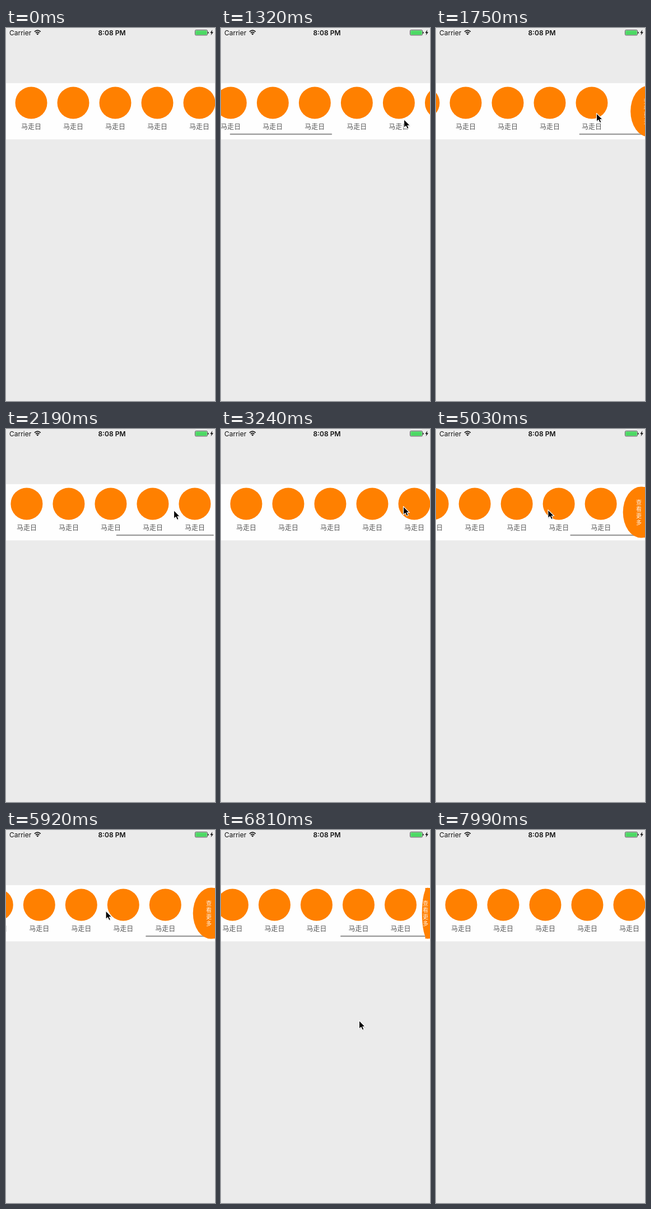
These frames come from a looping animation (373x663 px, 8.43 s). An HTML page:

```html
<!DOCTYPE html>
<html lang="zh">
<head>
<meta charset="utf-8">
<title>Scroll for more</title>
<style>
  html, body { margin: 0; width: 100%; height: 100%; overflow: hidden; background: #ebebeb; }
  svg { display: block; width: 373px; height: 663px; }
  text { text-anchor: middle; }
  .bar { font: 12px Inter, "Open Sans", sans-serif; fill: #111; }
  .label { font: 12px "Noto Sans CJK SC", "Noto Sans CJK", sans-serif; fill: #555; }
  .hint { font: 10px "Noto Sans CJK SC", "Noto Sans CJK", sans-serif; fill: #fff; fill-opacity: .9; }
</style>
</head>
<body>
<svg viewBox="0 0 373 663" xmlns="http://www.w3.org/2000/svg">
  <rect width="373" height="663" fill="#ebebeb"/>

  <g class="bar">
    <text x="6" y="12.5" style="text-anchor:start">Carrier</text>
    <text x="189" y="12.5" style="font-weight:600">8:08 PM</text>
  </g>
  <g fill="none" stroke="#111" stroke-width="1.7">
    <path d="M50.9 6.7Q56.3 1.6 61.7 6.7"/>
    <path d="M53 8.9Q56.3 5.9 59.6 8.9"/>
  </g>
  <path d="M54.2 10.3Q56.3 8.6 58.4 10.3L56.3 12.5Z" fill="#111"/>
  <rect x="337.5" y="3.5" width="22" height="9.4" rx="1.8" fill="none" stroke="#333" stroke-width=".8"/>
  <rect x="338.4" y="4.4" width="20.2" height="7.6" rx="1" fill="#4cd964"/>
  <path d="M360.4 6.4Q362 6.8 362 8.2T360.4 10Z" fill="#222"/>
  <path d="M368.4 3L364.4 8.7H366.8L365.6 13L370 7.2H367.4Z" fill="#111"/>

  <rect y="98" width="373" height="100" fill="#fefefe"/>
  <g id="row"></g>
  <rect id="thumb" y="187.4" height="2.5" rx="1.25" fill="#000" fill-opacity=".37"/>
  <g id="more">
    <rect x="361.5" y="103" width="40" height="90" fill="#ff8000"/>
    <ellipse id="bulge" cx="366" cy="148" ry="45.5" fill="#ff8000"/>
    <g id="hint" class="hint"></g>
  </g>
  <g id="cursor">
    <path d="M1.4 2.2V16.8L4.6 13.8L6.8 18.4L9.4 17.4L7.4 12.8H12.2Z" fill="#000" opacity=".2"/>
    <path d="M.5 .6V15.7L4 12.5L6.3 17.6L9.1 16.4L6.9 11.5H11.4Z" fill="#000" stroke="#fff" stroke-width="1.1" stroke-linejoin="round"/>
  </g>
</svg>
<script>
const LOOP = 8430, STEP = 148.2, FIRST = 1320;
const COUNT = 10, PITCH = 75, END = 375;
const FLICK = FIRST - STEP, BOUNCE = FIRST + 3 * STEP;
const GRAB = 3240, RELEASE = FIRST + 37 * STEP;

const byId = id => document.getElementById(id);
const [row, thumb, more, bulge, hint, cursor] =
  ["row", "thumb", "more", "bulge", "hint", "cursor"].map(byId);

function add(parent, tag, attrs, content) {
  const el = document.createElementNS("http://www.w3.org/2000/svg", tag);
  for (const key in attrs) el.setAttribute(key, attrs[key]);
  if (content) el.textContent = content;
  parent.appendChild(el);
}

for (let i = 0; i < COUNT; i++) {
  const x = 45 + PITCH * i;
  add(row, "circle", { cx: x, cy: 133, r: 28.5, fill: "#ff8000" });
  add(row, "text", { x, y: 180, class: "label" }, "马走日");
}
[..."查看更多"].forEach((ch, i) => add(hint, "text", { x: 362, y: 134.4 + 11.8 * i }, ch));

const clamp = (v, lo, hi) => Math.max(lo, Math.min(hi, v));
const progress = (t, from, to) => clamp((t - from) / (to - from), 0, 1);
const smooth = p => p * p * (3 - 2 * p);
const decay = (t, from, tau) => Math.exp((from - t) / tau);
const pulse = (t, from, to) => progress(t, from, from + STEP) * progress(-t, -to, 300 - to);

// Pointer gestures: start time, end time, x and y reached
const moves = [
  [FLICK, 1620, 262, 152],
  [1620, BOUNCE, 286, 151],
  [BOUNCE, 2640, 335, 124],
  [3092, GRAB, 325, 137],
  [GRAB, 3830, 240.5, 143],
  [4280, 5470, 180.5, 143],
  [5620, 6360, 172, 143],
  [6660, RELEASE, 246, 338],
  [RELEASE, 7840, 338, 662]
];

function pointer(t) {
  let x = 348, y = 165;
  for (const [from, to, toX, toY] of moves) {
    const p = smooth(progress(t, from, to));
    x += (toX - x) * p;
    y += (toY - y) * p;
  }
  return [x, y];
}

// Distance scrolled past the end of the row
function pull(t, x) {
  if (t < BOUNCE) return -END + (END + 67) * progress(t, FLICK, BOUNCE) ** 2;
  if (t < GRAB) return 67 * decay(t, BOUNCE, 140);
  if (t < RELEASE) return Math.max(0, 0.45 * (312.4 - x));
  return 24.5 * decay(t, RELEASE, 150);
}

function draw(time) {
  const t = FIRST + Math.floor((time - FIRST + 17) / STEP) * STEP;
  const [x, y] = pointer(t);
  const over = pull(t, x);
  const begun = t > FLICK + 1;
  row.setAttribute("transform", `translate(${begun ? -END - over : 0})`);

  const left = 188.5 + (over < 0 ? over * 186.5 / END : over);
  thumb.setAttribute("x", left);
  thumb.setAttribute("width", Math.min(182.5, 371 - left));
  thumb.setAttribute("opacity", pulse(t, FLICK, 2640) + pulse(t, GRAB + 7, 7700));

  // The tab slides in first, then bulges up to a limit
  const late = t < BOUNCE ? 0 : 13.5 * decay(t, BOUNCE, 100);
  more.setAttribute("transform", `translate(${clamp(27.5 - over, 0, 27.5) + late})`);
  more.setAttribute("visibility", over > 0.5 ? "visible" : "hidden");
  bulge.setAttribute("rx", 10.3 + clamp(over - 27.5, 0, 22));

  cursor.setAttribute("visibility", time >= 1050 && time < 7985 ? "visible" : "hidden");
  cursor.setAttribute("transform", `translate(${x} ${y})`);
}

const begin = performance.now();
function tick() {
  draw((performance.now() - begin) % LOOP);
  requestAnimationFrame(tick);
}
tick();
</script>
</body>
</html>
```
